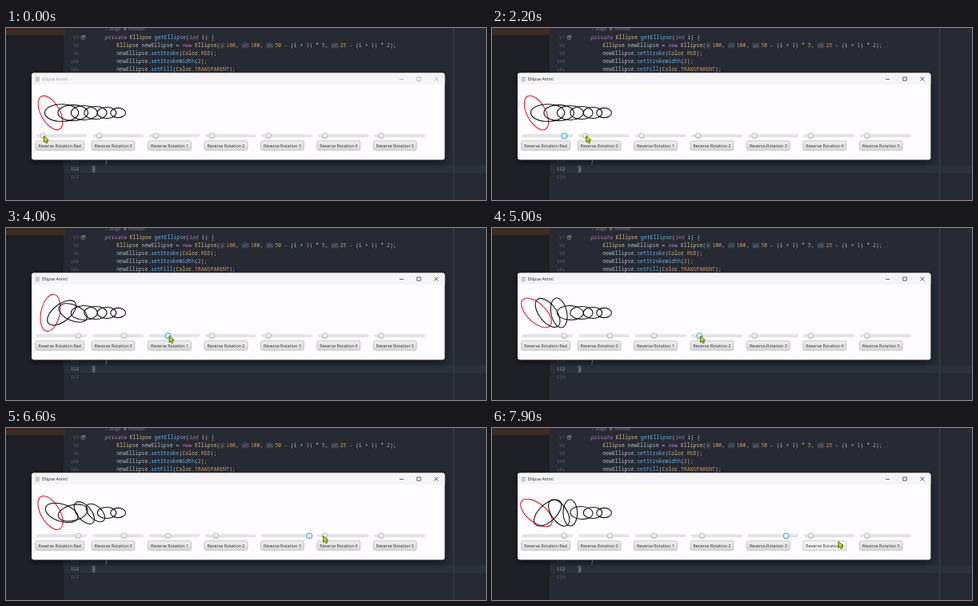
An HTML page with a canvas for the animation above (8 s loop, 600 px wide and 216 px high).

```html
<!DOCTYPE html>
<html lang="en">
<head>
<meta charset="utf-8">
<title>Ellipse Anim!</title>
<style>
html, body { margin: 0; width: 100%; height: 100%; overflow: hidden; background: #272a33; }
canvas { display: block; }
</style>
</head>
<body>
<canvas id="stage" width="600" height="216"></canvas>
<script>
const ctx = document.getElementById('stage').getContext('2d');
const LOOP = 8000, STEP = 100, REST = 200;
const SCALE = 0.47, PITCH = 70.45, TRACK_X = 38.3, TRACK_W = 62.5;
const REST_OFFSET = 8, MAX_OFFSET = 59;
const SPIN = 2.35; // degrees per second for each pixel of slider offset
const SANS = '"Open Sans", "Noto Sans", sans-serif';
const MONO = '"Noto Sans Mono", "DejaVu Sans Mono", monospace';
const UI = '5.4px ' + SANS, CODE = '500 6.53px ' + MONO;
const C = { plain: '#b4bac6', key: '#c678dd', type: '#dcbb7c', call: '#61afef', num: '#d19a66', dim: '#5a5e69' };

// One drag for each slider in turn; swing is how far it overshoots
const drags = [
  { from: 400, end: 1300, to: 52 },
  { from: 2300, end: 2650, to: 38.7 },
  { from: 3480, end: 3750, to: 23.3 },
  { from: 4900, end: 5150, to: 12.8 },
  { from: 6080, end: 7475, to: 47.6, swing: 110 }
];

const progress = (t, a, b) => Math.min(1, Math.max(0, (t - a) / (b - a)));
const smooth = p => p * p * (3 - 2 * p);
const trackX = i => TRACK_X + i * PITCH;

function pull(i, t) {
  const d = drags[i];
  if (!d) return REST_OFFSET;
  const p = progress(t, d.from, d.end);
  const swing = (d.swing || 0) * (1 - p) * Math.sin(2 * Math.PI * p * p);
  return REST_OFFSET + (d.to - REST_OFFSET) * p + swing;
}

const offset = (i, t) => Math.min(MAX_OFFSET, pull(i, t));

// Sum the speed over time; the red ellipse is already spinning at the start
function angle(i, t) {
  if (!drags[i]) return 0;
  const dt = 20;
  let deg = i ? 0 : 61;
  for (let s = i ? drags[i].from : 0; s < t; s += dt) deg += SPIN * offset(i, s + dt / 2) * dt / 1000;
  return deg;
}

// The pointer holds the thumb while dragging, rests, then glides to the next one
function pointerAt(t) {
  const i = Math.max(0, drags.findLastIndex(d => d.from <= t));
  const next = drags[i + 1];
  const x = trackX(i) + pull(i, t) + 1, y = 135.5;
  const goal = next ? [trackX(i + 1) + REST_OFFSET + 1, y] : [433, 142.5];
  const p = smooth(progress(t, drags[i].end + REST, (next ? next.from : LOOP) - 100));
  return [x + (goal[0] - x) * p, y + (goal[1] - y) * p];
}

function rect(x, y, w, h, color) {
  ctx.fillStyle = color;
  ctx.fillRect(x, y, w, h);
}

function stroke(color, width) {
  ctx.strokeStyle = color;
  ctx.lineWidth = width;
  ctx.stroke();
}

function round(x, y, w, h, r, fill, line) {
  ctx.beginPath();
  ctx.roundRect(x, y, w, h, r);
  ctx.fillStyle = fill;
  ctx.fill();
  if (line) stroke(line, 0.7);
}

function fade(y, h, top, bottom) {
  const g = ctx.createLinearGradient(0, y, 0, y + h);
  g.addColorStop(0, top);
  g.addColorStop(1, bottom);
  return g;
}

function text(str, x, y, font, color, align = 'left') {
  ctx.font = font;
  ctx.fillStyle = color;
  ctx.textAlign = align;
  ctx.fillText(str, x, y);
  return ctx.measureText(str).width;
}

function hint(str, x, y) {
  const font = '5px ' + SANS;
  ctx.font = font;
  const w = ctx.measureText(str).width;
  round(x, y - 5.6, w + 2.6, 7.4, 1.5, '#3a3d47');
  text(str, x + 1.3, y - 0.2, font, '#868a94');
  return w + 4.2;
}

// Colours one line of code; «…» marks an inlay hint
function code(str, x, y) {
  for (const part of str.match(/«.*?»|\w+|\W/g)) {
    if (part[0] === '«') {
      x += hint(part.slice(1, -1), x, y);
      continue;
    }
    const kind = /^(private|new|int)$/.test(part) ? 'key'
      : /^\d/.test(part) || /^[A-Z]{2,}$/.test(part) ? 'num'
      : /^[sg]et/.test(part) ? 'call'
      : /^[A-Z]/.test(part) ? 'type' : 'plain';
    x += text(part, x, y, (kind === 'key' ? 'italic ' : '') + CODE, C[kind]);
  }
}

function drawEditor() {
  rect(0, 0, 600, 216, '#272a33');
  rect(0, 0, 72, 216, '#1f2025');
  rect(0, 0, 74, 9, '#3a2b24');
  rect(73, 172, 527, 10, '#2c303a');
  rect(559, 0, 1, 216, '#3b3e48');

  text('1 usage', 124, 3, UI, '#777b84');
  text('mordan', 153, 3, UI, '#777b84');
  ctx.beginPath();
  ctx.arc(148.5, 1.4, 1.4, 0, 7);
  ctx.fill();

  for (let row = 0; row < 5; row++) text(97 + row, 91, 13.6 + row * 10.2, '5.6px ' + MONO, C.dim, 'right');
  for (let row = 0; row < 3; row++) {
    text(111 + row, 91, 169 + row * 10.2, '5.6px ' + MONO, row === 1 ? '#a1a5b0' : C.dim, 'right');
  }
  text('@', 96.5, 13.8, '7.5px ' + SANS, '#b4b8bf', 'center');

  code('private Ellipse getEllipse(int i) {', 123.3, 13.6);
  [
    'Ellipse newEllipse = new Ellipse(«v:»100, «v1:»100, «v2:»50 - (i + 1) * 5, «v3:»25 - (i + 1) * 2);',
    'newEllipse.setStroke(Color.RED);',
    'newEllipse.setStrokeWidth(2);',
    'newEllipse.setFill(Color.TRANSPARENT);'
  ].forEach((line, i) => code(line, 138.2, 23.8 + i * 10.2));
  code('}', 123.3, 169);
  rect(107.5, 172.5, 4.5, 9, '#454953');
  code('}', 107.8, 179.2);
}

function drawWindow(active) {
  const ink = active ? '#222' : '#a0a0a0';
  ctx.save();
  ctx.shadowColor = 'rgba(0,0,0,.5)';
  ctx.shadowBlur = 9;
  ctx.shadowOffsetY = 3;
  round(32, 56.6, 516.4, 108.9, 3, '#fefcfe');
  ctx.restore();
  round(32, 56.6, 516.4, 14.2, [3, 3, 0, 0], '#f4f3f6');
  rect(36.5, 61, 5.5, 6.5, '#c9ced2');
  text('Ellipse Anim!', 45, 66.2, UI, ink);
  ctx.beginPath();
  ctx.moveTo(492, 64.4);
  ctx.lineTo(497, 64.4);
  ctx.rect(513.8, 61.8, 4.4, 4.4);
  for (const dy of [-2.4, 2.4]) {
    ctx.moveTo(535.5, 64.1 - dy);
    ctx.lineTo(540.3, 64.1 + dy);
  }
  stroke(ink, 0.7);
}

function drawEllipse(i, t) {
  ctx.beginPath();
  ctx.ellipse(55.5 + i * 14.1, 106.5, (50 - i * 5) * SCALE, (25 - i * 2) * SCALE,
    angle(i, t) * Math.PI / 180, 0, Math.PI * 2);
  stroke(i ? '#111' : '#dc1f24', 1.1);
}

function drawControls(i, focused, t, [px, py]) {
  const x = trackX(i);
  round(x, 134.1, TRACK_W, 2.4, 1.2, fade(134, 2.4, '#e0e0e0', '#f6f6f6'), '#cbcbcb');
  ctx.beginPath();
  ctx.arc(x + offset(i, t), 135.4, 3.4, 0, 7);
  ctx.fillStyle = fade(132, 7, '#f8f8f8', '#dadada');
  ctx.fill();
  stroke(focused ? '#3fb0d9' : '#b0b0b0', focused ? 1.1 : 0.8);

  const bx = x - 1.7, w = i ? 54 : 61;
  const hover = px > bx && px < bx + w && py > 141.5;
  const fill = hover ? fade(142, 11, '#fbfbfb', '#ececec') : fade(142, 11, '#efefef', '#d9d9d9');
  round(bx, 141.8, w, 11.6, 1.8, fill, '#b3b3b3');
  text('Reverse Rotation ' + (i ? i - 1 : 'Red'), bx + w / 2, 149.7, UI, '#2b2b2b', 'center');
}

function drawPointer([x, y]) {
  ctx.save();
  ctx.translate(x, y);
  const arrow = new Path2D('M0 0V8L1.9 6.5L3.2 9.2L4.9 8.4L3.6 5.8L6 5.5Z');
  ctx.fillStyle = '#c6e312';
  ctx.fill(arrow);
  ctx.strokeStyle = '#38420c';
  ctx.lineWidth = 0.8;
  ctx.stroke(arrow);
  ctx.restore();
}

function draw() {
  const t = Math.floor(performance.now() % LOOP / STEP) * STEP;
  const pointer = pointerAt(t);
  const focus = drags.findLastIndex(d => d.from <= t);
  drawEditor();
  drawWindow(focus >= 0);
  for (let i = 0; i < 7; i++) {
    drawEllipse(i, t);
    drawControls(i, i === focus, t, pointer);
  }
  drawPointer(pointer);
  requestAnimationFrame(draw);
}
draw();
</script>
</body>
</html>
```
